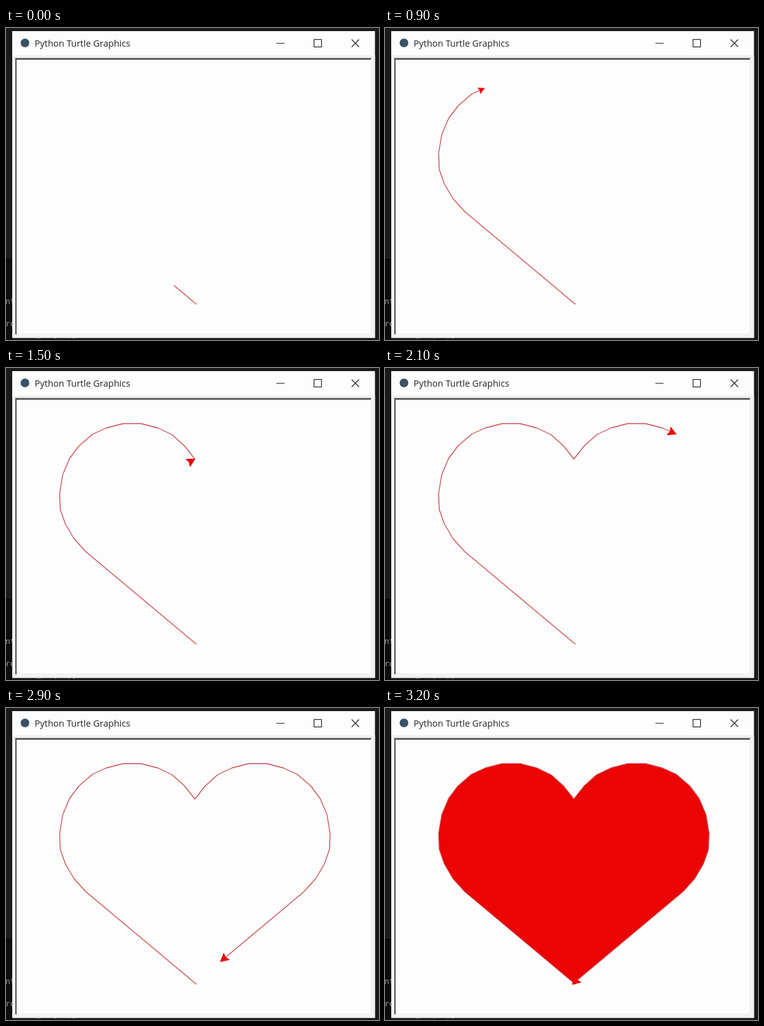
Write an HTML page with a canvas that moves like this. It is 600 px wide and 502 px high and loops after 3300 ms.

```html
<!DOCTYPE html>
<html lang="en">
<head>
<meta charset="utf-8">
<title>Turtle heart</title>
<style>
html, body { margin: 0; width: 600px; height: 502px; overflow: hidden; background: #1b191b; }
canvas { display: block; }
</style>
</head>
<body>
<canvas id="stage" width="600" height="502"></canvas>
<script>
const ctx = document.getElementById('stage').getContext('2d');
const LOOP = 3300, STEP = 100, FILL_STEP = 30;
const TURN_START = 12.4, TURN_END = 15.9;

// Left half of the heart; the right half is its mirror image.
const left = [[306, 444], [128, 295], [109, 274], [95, 250], [87, 227], [86, 201],
  [91, 171], [102, 145], [117, 125], [139, 106], [161, 96], [188, 89], [217, 89],
  [244, 96], [267, 107], [287, 125], [303.5, 146]];
const right = left.slice(0, -1).reverse().map(([x, y]) => [607 - x, y]);
const points = [...left, ...right];

const lengths = points.slice(1).map(([x, y], i) => Math.hypot(x - points[i][0], y - points[i][1]));
const total = lengths.reduce((a, b) => a + b);
const half = total / 2;

// Step number and distance drawn by then.
const keys = [[0, 47.5], [9, 474], [TURN_START, half], [TURN_END, half],
  [18, half + 71], [21, half + 188], [29, total - 57], [FILL_STEP, total]];

function distanceAt(step) {
  const i = keys.findIndex(k => k[0] > step);
  if (i < 0) return total;
  const [s0, d0] = keys[i - 1], [s1, d1] = keys[i];
  return d0 + (d1 - d0) * (step - s0) / (s1 - s0);
}

function rect(color, x, y, w, h) {
  ctx.fillStyle = color;
  ctx.fillRect(x, y, w, h);
}

function text(str, x, y, font, color) {
  ctx.font = font;
  ctx.fillStyle = color;
  ctx.fillText(str, x, y);
}

function trace(list) {
  ctx.beginPath();
  list.forEach(([x, y]) => ctx.lineTo(x, y));
}

function drawWindow() {
  rect('#1b191b', 0, 0, 600, 502);
  rect('#0d0d0e', 0, 370, 10, 132);
  rect('#29272a', 0, 369, 10, 1);
  const mono = '"DejaVu Sans Mono", monospace';
  text('nt', -1, 444, '13px ' + mono, '#9a9a9a');
  text('ro', -1, 480, '13px ' + mono, '#9a9a9a');
  text('turn_shape.py', 20, 497, '12px ' + mono, '#8a8a8a');

  rect('#fdfdfe', 10, 5, 583.5, 493.5);
  rect('#f1f1f3', 10, 44, 583.5, 454.5);
  rect('#fefdfe', 15, 49, 574, 445);
  rect('#8c8c8e', 14, 48, 574, 1);
  rect('#4c4c50', 15, 49, 572, 2);
  rect('#4c4c50', 15, 49, 2, 444);
  rect('#e2e2e5', 587, 51, 1, 442);
  rect('#e2e2e5', 17, 492, 571, 1);

  ctx.fillStyle = '#3b5364';
  ctx.beginPath();
  ctx.arc(30.5, 24, 7, 0, 7);
  ctx.fill();
  text('Python Turtle Graphics', 46, 30, '14.5px "Open Sans", "Noto Sans", sans-serif', '#222');

  ctx.strokeStyle = '#222';
  ctx.lineWidth = 1.2;
  ctx.strokeRect(495.5, 18.5, 12, 12);
  ctx.beginPath();
  for (const [x, y, u, v] of [[435, 24.5, 448, 24.5], [556, 18.5, 568, 30.5], [568, 18.5, 556, 30.5]]) {
    ctx.moveTo(x, y);
    ctx.lineTo(u, v);
  }
  ctx.stroke();
}

function drawHead([x, y], angle, scale) {
  ctx.save();
  ctx.translate(x, y);
  ctx.rotate(angle);
  ctx.scale(scale, scale);
  trace([[0, 0], [-12.5, -6.7], [-10.5, 0], [-12.5, 6.7]]);
  ctx.closePath();
  ctx.fillStyle = ctx.strokeStyle = '#ea0808';
  ctx.lineWidth = 1;
  ctx.fill();
  ctx.stroke();
  ctx.restore();
}

function drawHeart(step) {
  let rest = distanceAt(step), i = 0;
  while (i < lengths.length - 1 && rest > lengths[i] + 0.001) rest -= lengths[i++];
  const [x, y] = points[i], [u, v] = points[i + 1];
  const k = rest / lengths[i];
  const tip = [x + (u - x) * k, y + (v - y) * k];
  let angle = Math.atan2(v - y, u - x);
  if (step > TURN_START && step < TURN_END) {
    angle = Math.PI / 3 * (1 - 2 * (step - TURN_START) / (TURN_END - TURN_START));
  }

  ctx.save();
  ctx.translate(0.3, 0.5);
  trace([...points.slice(0, i + 1), tip]);
  ctx.lineWidth = 1.3;
  ctx.lineJoin = 'round';
  ctx.strokeStyle = '#c8484b';
  if (step >= FILL_STEP) {
    ctx.fillStyle = '#ec0303';
    ctx.fill();
  }
  ctx.stroke();
  // The arrowhead shows up only once the first line is under way.
  if (step > 0) drawHead(tip, angle, step < 10 ? 0.75 : 1);
  ctx.restore();
}

function frame(now) {
  drawWindow();
  drawHeart(Math.floor(now % LOOP / STEP));
  requestAnimationFrame(() => frame(performance.now() - start));
}

const start = performance.now();
frame(0);
</script>
</body>
</html>
```
